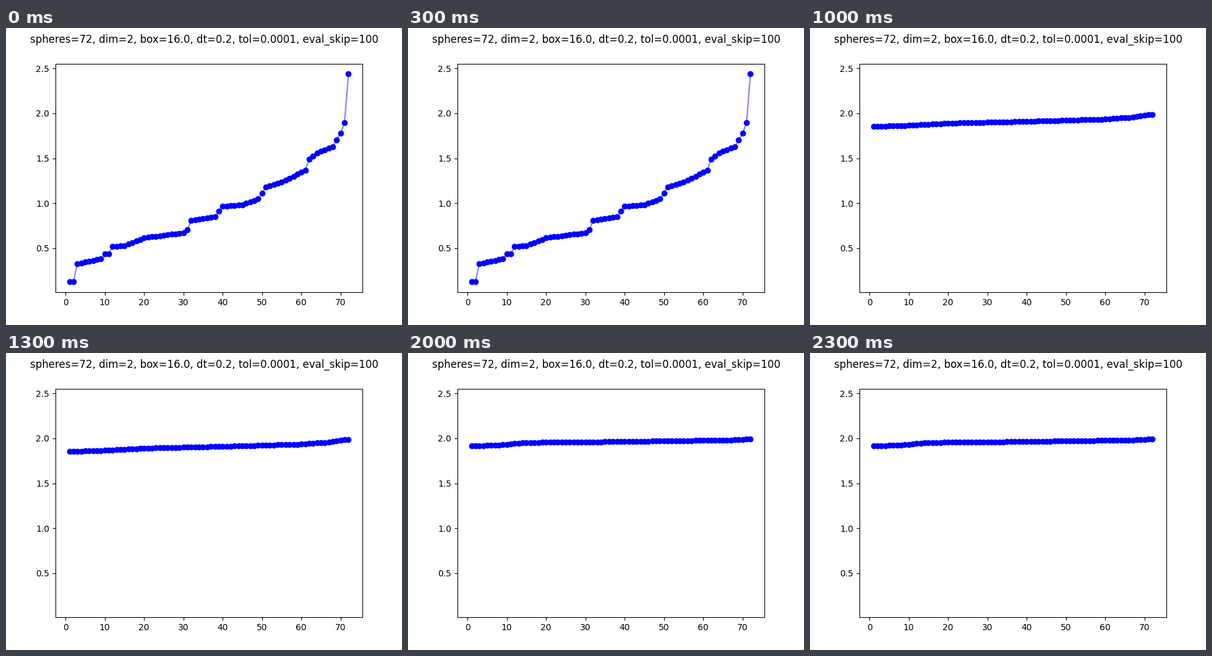
Write a matplotlib script that moves like this. It is 640 px wide and 480 px high and loops after 2500 ms.

```python
import numpy as np
import matplotlib.pyplot as plt
from matplotlib.animation import FuncAnimation

ranks = np.arange(1, 73)

# Corners of the unsettled curve: (rank, distance)
START = [
    (1, 0.1244), (2, 0.1244), (3, 0.327), (9, 0.382), (10, 0.437),
    (11, 0.437), (12, 0.519), (15, 0.526), (20, 0.616), (30, 0.671),
    (31, 0.705), (32, 0.809), (38, 0.850), (40, 0.967), (45, 0.981),
    (49, 1.049), (51, 1.180), (55, 1.235), (61, 1.366), (62, 1.490),
    (64, 1.559), (68, 1.628), (70, 1.779), (71, 1.896), (72, 2.4373),
]

# The settling curves bend at the same few ranks
BENDS = [1, 8, 14, 20, 40, 60, 67, 71, 72]
STAGES = [
    [1.791, 1.833, 1.841, 1.848, 1.881, 1.917, 1.944, 1.964, 1.993],
    [1.854, 1.863, 1.876, 1.890, 1.910, 1.935, 1.958, 1.985, 1.987],
    [1.867, 1.880, 1.889, 1.908, 1.925, 1.951, 1.965, 1.972, 1.993],
    [1.916, 1.924, 1.951, 1.956, 1.964, 1.977, 1.980, 1.991, 1.993],
]

curves = [np.interp(ranks, *zip(*START))]
curves += [np.interp(ranks, BENDS, stage) for stage in STAGES]

fig, ax = plt.subplots(figsize=(6.4, 4.8), dpi=100)
fig.suptitle("spheres=72, dim=2, box=16.0, dt=0.2, tol=0.0001, eval_skip=100")
line, = ax.plot(ranks, curves[0], "b-", alpha=0.5)
dots, = ax.plot(ranks, curves[0], "bo")
ax.set_ylim(ax.get_ylim())  # keep the first view


def update(i):
    line.set_ydata(curves[i])
    dots.set_ydata(curves[i])
    return line, dots


anim = FuncAnimation(fig, update, frames=len(curves), interval=500, repeat=True)
plt.show()
```
